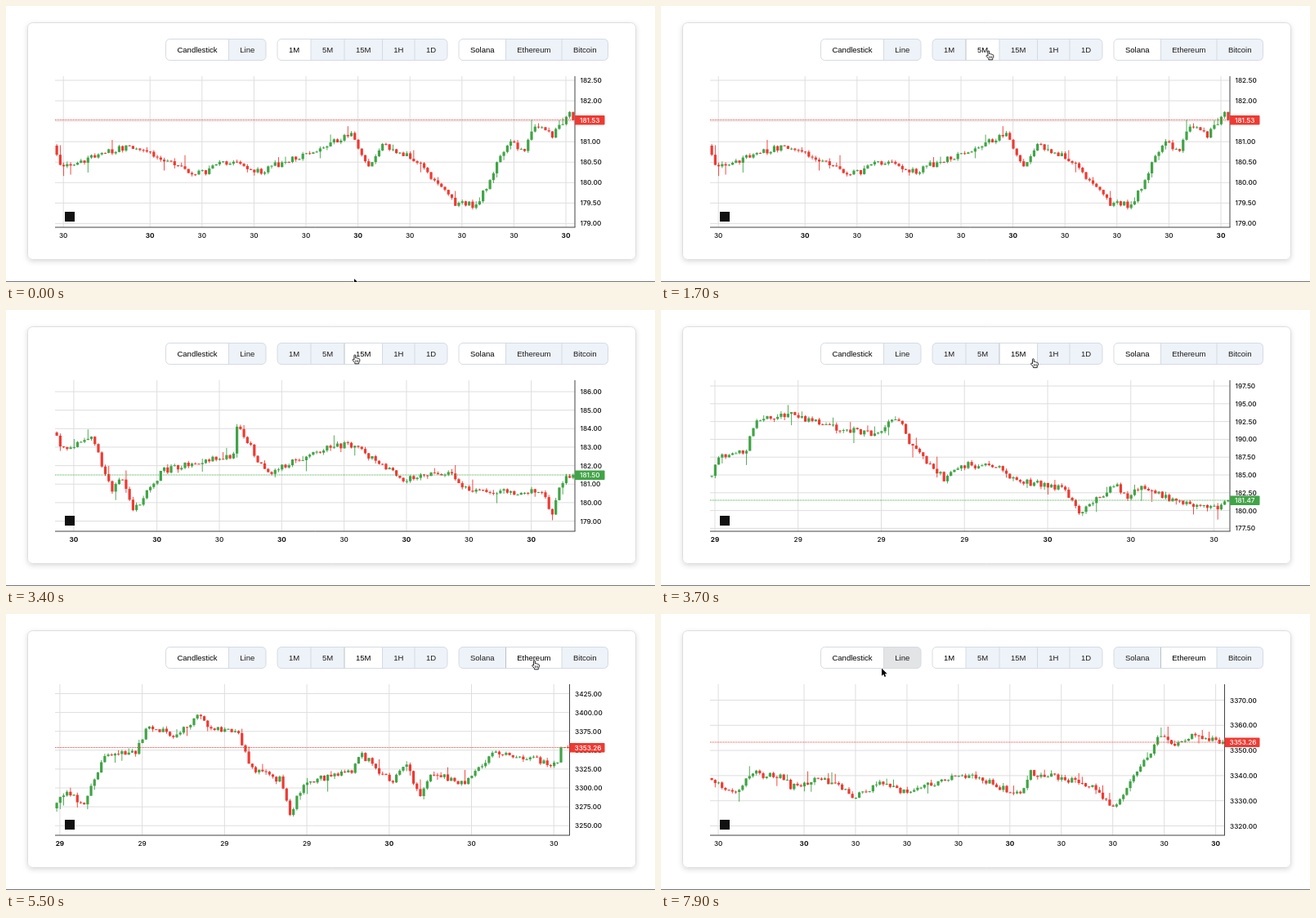
Recreate the animation shown at these times as an HTML page with a canvas. Size 794 by 338 pixels, loop 8 s.

```html
<!DOCTYPE html>
<html lang="en">
<head>
<meta charset="utf-8">
<title>Price chart</title>
<style>
html, body { margin: 0; width: 100%; height: 100%; overflow: hidden; background: #fff; }
canvas { display: block; width: 794px; height: 338px; }
</style>
</head>
<body>
<canvas id="stage"></canvas>
<script>
const WIDTH = 794, HEIGHT = 338, LOOP = 8000, BARS = 150;
const LEFT = 60, TOP = 86, BOTTOM = 271, BUTTON_TOP = 40.5, BUTTON_HEIGHT = 26;
const CHART_DELAY = 150, HOVER_FADE = 200;
const RED = '#ee3a32', GREEN = '#41a447', GRID = '#dedede', AXIS = '#444', EDGE = '#d5dbe3';
const AXIS_FONT = '8.2px Inter, sans-serif';
const BUTTON_FONT = '9.5px "Liberation Sans", Arial, sans-serif';

const canvas = document.getElementById('stage');
const ctx = canvas.getContext('2d');
const ratio = window.devicePixelRatio || 1;
canvas.width = WIDTH * ratio;
canvas.height = HEIGHT * ratio;
ctx.scale(ratio, ratio);

const range = (from, to, by = 1) =>
  Array.from({ length: Math.floor((to - from) / by) + 1 }, (_, i) => from + i * by);
const clamp = v => Math.max(0, Math.min(1, v));
const random = seed => { const v = Math.sin(seed * 127.1 + 11.7) * 43758.5453; return v - Math.floor(v); };

// Linear interpolation through [position, ...values] points.
function follow(points, at) {
  const i = Math.max(1, points.findIndex(p => p[0] >= at));
  const [start, ...from] = points[i - 1], [end, ...to] = points[i];
  const k = clamp((at - start) / (end - start));
  return from.map((v, n) => v + (to[n] - v) * k);
}

// Bars that carry a vertical grid line, and those with a bold date.
const timeframes = {
  '1M': { days: [2, ...range(27, 147, 15)], bold: range(27, 147, 60), date: () => '30' },
  '5M': { days: [5, ...range(29, 137, 18)], bold: [5, ...range(29, 137, 36)], date: () => '30' },
  '15M': { days: range(1, 145, 24), bold: range(1, 97, 96), date: bar => bar < 97 ? '29' : '30' }
};

// scale: first label y, spacing, first value, value step; trend: key [x, y] points of the price
const scenes = [
  {
    start: 0, frame: '1M', coin: 'Solana', right: 696, scale: [91, 25.05, 182.5, 0.5],
    price: '181.53', priceY: 139.5, color: RED,
    trend: [[60, 171], [66, 198], [150, 171], [235, 206], [272, 190], [309, 203], [424, 158], [443, 198],
      [460, 170], [502, 188], [548, 241], [576, 244], [617, 162], [632, 180], [648, 146], [670, 158], [691, 128], [694, 139.5]]
  },
  {
    start: 1700, frame: '5M', coin: 'Solana', right: 696, scale: [100, 22.65, 186, 1],
    price: '181.50', priceY: 202, color: GREEN,
    trend: [[60, 150], [70, 172], [104, 154], [129, 220], [142, 208], [156, 246], [192, 197], [278, 177],
      [283, 139], [318, 200], [400, 165], [428, 167], [487, 208], [540, 198], [568, 222], [655, 223],
      [669, 249], [678, 211], [694, 202]]
  },
  {
    start: 3300, frame: '15M', coin: 'Solana', right: 696, scale: [93, 21.8, 197.5, 2.5],
    price: '181.47', priceY: 233, color: GREEN,
    trend: [[60, 204], [72, 177], [104, 174], [115, 136], [160, 128], [205, 143], [260, 151], [285, 135],
      [297, 143], [306, 167], [346, 206], [372, 190], [412, 190], [430, 208], [494, 218], [512, 249],
      [557, 212], [568, 229], [594, 216], [625, 233], [684, 243], [694, 233]]
  },
  {
    start: 4800, frame: '15M', coin: 'Ethereum', right: 689.5, scale: [97.5, 23.1, 3425, 25],
    price: '3353.26', priceY: 163.5, color: RED,
    trend: [[60, 238], [70, 219], [97, 232], [120, 170], [158, 171], [174, 138], [208, 148], [235, 126],
      [250, 140], [283, 144], [301, 191], [335, 203], [348, 244], [364, 208], [424, 191], [434, 171],
      [472, 206], [488, 182], [507, 223], [522, 195], [560, 209], [600, 168], [674, 185], [678, 161], [687, 163.5]]
  },
  {
    start: 7200, frame: '1M', coin: 'Ethereum', right: 689.5, scale: [105.5, 30.8, 3370, 10],
    price: '3353.26', priceY: 157, color: RED,
    trend: [[60, 201], [87, 221], [112, 195], [150, 201], [160, 212], [196, 200], [238, 224], [272, 207],
      [304, 220], [350, 200], [385, 200], [440, 222], [450, 194], [505, 204], [530, 210], [549, 235],
      [564, 228], [583, 188], [600, 170], [606, 147], [632, 160], [646, 149], [687, 157]]
  }
];

const groups = [
  { edges: [195.5, 272.5, 318], labels: ['Candlestick', 'Line'] },
  { edges: [332, 373, 414, 460.5, 500, 540], labels: ['1M', '5M', '15M', '1H', '1D'] },
  { edges: [554, 611.5, 680, 736.5], labels: ['Solana', 'Ethereum', 'Bitcoin'] }
];

const cursorPath = [[0, 426, 334], [100, 426, 334], [600, 416.5, 74], [950, 401, 55], [2500, 401, 55],
  [2900, 427, 55], [3600, 427, 55], [4000, 540, 74], [4400, 647, 57], [5500, 647, 57], [5950, 480, 74],
  [6400, 320, 70], [6550, 314, 60], [6700, 316, 60], [6800, 333, 56], [7000, 349, 60], [7350, 349, 60],
  [7900, 270, 66.5]];

const sceneAt = t => scenes.filter(scene => scene.start <= t).pop() || scenes[0];

function makeCandles({ right, trend, priceY, start }) {
  const pitch = (right - LEFT) / BARS;
  let open = trend[0][1];
  return range(0, BARS - 1).map(i => {
    const x = LEFT + (i + 0.5) * pitch, seed = start + i * 3;
    const close = i === BARS - 1 ? priceY : follow(trend, x)[0] + (random(seed) - 0.5) * 8;
    const wick = n => 3 * random(seed + n) + 12 * random(seed + n) ** 24;
    const candle = {
      x, top: Math.min(open, close), bottom: Math.max(open, close),
      upper: wick(1), lower: wick(2), color: close < open ? GREEN : RED
    };
    open = close;
    return candle;
  });
}
scenes.forEach(scene => { scene.candles = makeCandles(scene); });

function line(x0, y0, x1, y1, color, dash = []) {
  ctx.strokeStyle = color;
  ctx.lineWidth = 1;
  ctx.setLineDash(dash);
  ctx.beginPath();
  ctx.moveTo(x0, y0);
  ctx.lineTo(x1, y1);
  ctx.stroke();
  ctx.setLineDash([]);
}

function text(string, x, y, font, color = '#111', align = 'left') {
  ctx.font = font;
  ctx.fillStyle = color;
  ctx.textAlign = align;
  ctx.fillText(string, x, y);
}

function roundRect(x, y, w, h, radius) {
  ctx.beginPath();
  ctx.roundRect(x, y, w, h, radius);
}

function drawCard() {
  ctx.fillStyle = '#fff';
  ctx.fillRect(0, 0, WIDTH, HEIGHT);
  ctx.save();
  ctx.shadowColor = 'rgba(0,0,0,.14)';
  ctx.shadowBlur = 6 * ratio;
  ctx.shadowOffsetY = 2 * ratio;
  roundRect(26, 20, 745, 291, 6);
  ctx.fill();
  ctx.restore();
  roundRect(26.5, 20.5, 744, 290, 6);
  ctx.strokeStyle = '#dedede';
  ctx.lineWidth = 1;
  ctx.stroke();
  line(0, 337.5, WIDTH, 337.5, '#777');
}

function cursorInside(left, right, t) {
  const [x, y] = follow(cursorPath, Math.min(t, 7900));
  return x >= left && x <= right && y >= BUTTON_TOP && y < 66;
}

// Share of the last moments the cursor spent on the button.
function hoverAmount(left, right, t) {
  const moments = range(0, HOVER_FADE, 20);
  return moments.filter(ago => cursorInside(left, right, Math.max(0, t - ago))).length / moments.length;
}

function drawButtons(t) {
  const { frame, coin } = sceneAt(t);
  const selected = ['Candlestick', frame, coin];
  for (const { edges, labels } of groups) {
    const left = edges[0], width = edges[edges.length - 1] - left;
    ctx.save();
    roundRect(left, BUTTON_TOP, width, BUTTON_HEIGHT, 5);
    ctx.clip();
    labels.forEach((label, i) => {
      const x = edges[i], end = edges[i + 1], active = selected.includes(label);
      ctx.fillStyle = active ? '#fff' : '#eef2f9';
      ctx.fillRect(x, BUTTON_TOP, end - x, BUTTON_HEIGHT);
      if (!active) {
        ctx.fillStyle = `rgba(224,224,224,${hoverAmount(x, end, t)})`;
        ctx.fillRect(x, BUTTON_TOP, end - x, BUTTON_HEIGHT);
      }
      if (i) line(x, BUTTON_TOP, x, BUTTON_TOP + BUTTON_HEIGHT, active ? '#bcc0c6' : EDGE);
      text(label, (x + end) / 2, 57, BUTTON_FONT, active ? '#000' : '#1c1c1c', 'center');
    });
    ctx.restore();
    roundRect(left, BUTTON_TOP, width, BUTTON_HEIGHT, 5);
    ctx.strokeStyle = EDGE;
    ctx.lineWidth = 1;
    ctx.stroke();
  }
}

function drawChart({ frame, right, scale, price, priceY, color, candles }) {
  const { days, bold, date } = timeframes[frame];
  const [firstY, gap, firstValue, valueStep] = scale;
  const pitch = (right - LEFT) / BARS, labelX = right + 6.5;

  for (const bar of days) {
    const x = LEFT + (bar + 0.5) * pitch - 0.4;
    line(x, TOP, x, BOTTOM, GRID);
    text(date(bar), x, 284, `${bold.includes(bar) ? 700 : 500} ${AXIS_FONT}`, '#111', 'center');
  }
  range(firstY, BOTTOM - 2, gap).forEach((y, i) => {
    line(LEFT, y, right, y, GRID);
    text((firstValue - i * valueStep).toFixed(2), labelX, y + 3, `500 ${AXIS_FONT}`);
  });

  for (const { x, top, bottom, upper, lower, color: fill } of candles) {
    ctx.fillStyle = fill;
    ctx.fillRect(x - 0.45, top - upper, 0.9, bottom - top + upper + lower);
    ctx.fillRect(x - 1.6, top, 3.2, Math.max(1, bottom - top));
  }

  line(LEFT, priceY, right, priceY, color, [1, 1]);
  line(right, TOP, right, BOTTOM, AXIS);
  line(LEFT, BOTTOM, right + 0.5, BOTTOM, AXIS);
  ctx.fillStyle = color;
  roundRect(right, priceY - 5.5, 732.5 - right, 11.5, [0, 1, 1, 0]);
  ctx.fill();
  text(price, labelX - 0.5, priceY + 3.2, `500 ${AXIS_FONT}`, '#fff');

  ctx.fillStyle = '#111';
  ctx.fillRect(72, 252, 12, 12);
}

const arrow = new Path2D('M0 0V10.2L2.4 8L4 11.6L5.7 10.8L4.2 7.4H7.4Z');
const hand = new Path2D('M-1.2 .8C-1.2-.4 .8-.4 .8 .8V4.2C1.5 3.6 2.6 3.8 2.8 4.6C3.6 4.1 4.6 4.4 4.7 5.2' +
  'C5.6 4.8 6.4 5.2 6.4 6.2V8.4L5.2 10.4V12H-.2V10.6L-3.2 7.2C-3.7 6.2-2.5 5.6-1.8 6.2L-1.2 6.8Z');
const knuckles = new Path2D('M.8 7V10M2.5 7V10M4.2 7V10');

function drawCursor(t) {
  const pointing = groups.some(({ edges }) => cursorInside(edges[0], edges[edges.length - 1], t));
  ctx.save();
  ctx.translate(...follow(cursorPath, Math.min(t, 7900)));
  ctx.scale(0.9, 0.9);
  ctx.lineJoin = 'round';
  if (pointing) {
    ctx.fillStyle = '#fff';
    ctx.strokeStyle = '#111';
    ctx.lineWidth = 1;
    ctx.fill(hand);
    ctx.stroke(hand);
    ctx.lineWidth = 0.7;
    ctx.stroke(knuckles);
  } else {
    ctx.strokeStyle = '#fff';
    ctx.lineWidth = 1.5;
    ctx.stroke(arrow);
    ctx.fillStyle = '#000';
    ctx.fill(arrow);
  }
  ctx.restore();
}

const began = performance.now();
function draw() {
  const t = Math.max(0, performance.now() - began) % LOOP;
  drawCard();
  drawChart(sceneAt(t - CHART_DELAY));
  drawButtons(t);
  drawCursor(t);
  requestAnimationFrame(draw);
}
draw();
</script>
</body>
</html>
```
